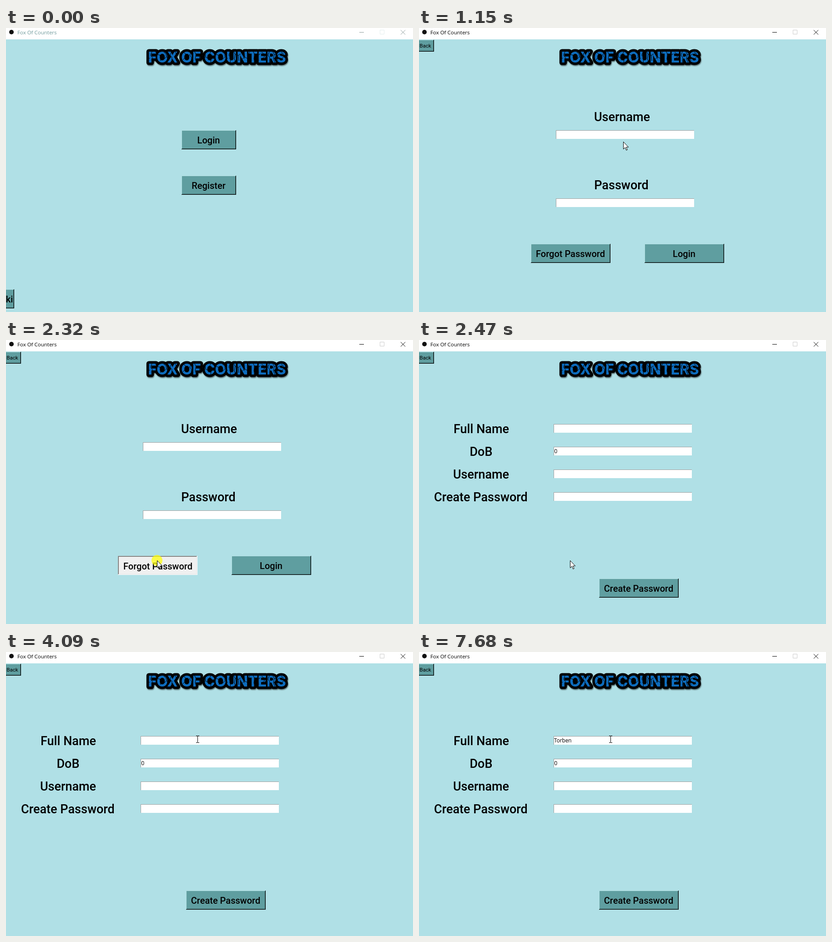
Write an HTML page that moves like this. It is 895 px wide and 625 px high and loops after 8000 ms.

```html
<!DOCTYPE html>
<html lang="en">
<head>
<meta charset="utf-8">
<title>Fox Of Counters</title>
<style>
  html, body { margin: 0; width: 100%; height: 100%; overflow: hidden; background: #b0e0e6; }
  svg { display: block; width: 895px; height: 625px; }
  text { fill: #000; white-space: pre; }
  .label { font: 500 27px Roboto, sans-serif; text-anchor: middle; }
  .button { font: 500 20px Roboto, sans-serif; text-anchor: middle; }
  .button.small { font: 400 11.5px Roboto, sans-serif; }
  .field { font: 11.7px "Open Sans", sans-serif; }
  .caption { font: 11.5px "Open Sans", sans-serif; }
  .banner { font: 800 32px Inter, sans-serif; text-anchor: middle; }
  .banner.rim { stroke: #000; stroke-width: 11; stroke-linejoin: round; filter: drop-shadow(1px 2px 1px #0008); }
  .banner.face { fill: url(#cracked); }
  .controls { fill: none; stroke: #000; }
  .controls .off { stroke: #ccc; }
  .idle .caption { fill: #6f9a9c; }
  .idle .controls { stroke: #8c9b9b; }
  .idle .off { stroke: #e4eeee; }
</style>
</head>
<body>
<svg viewBox="0 0 895 625">
  <defs>
    <pattern id="cracked" width="43" height="40" patternUnits="userSpaceOnUse">
      <rect width="43" height="40" fill="#0d6cbd"/>
      <path d="M3 13l5 4 1 7 6 3M20 12l-3 8 4 5-1 14M27 11l4 7 7 2 5-3M31 18l-2 10 4 9M8 24l-6 6M38 20l1 12"
            fill="none" stroke="#000" stroke-width="1"/>
    </pattern>
  </defs>
  <rect width="895" height="625" fill="#b0e0e6"/>
  <g id="bar">
    <rect width="895" height="25" fill="#fff"/>
    <circle cx="12" cy="9" r="5" fill="#111"/>
    <text class="caption" x="25" y="14">Fox Of Counters</text>
    <g class="controls">
      <path d="M777 9.5h10"/>
      <path class="off" d="M822.5 4.5h9v9h-9z"/>
      <path d="M868 4.5l10 10M878 4.5l-10 10"/>
    </g>
  </g>
  <text class="banner rim" x="464" y="76">FOX OF COUNTERS</text>
  <text class="banner face" x="464" y="76">FOX OF COUNTERS</text>
  <g id="home"></g>
  <g id="login"></g>
  <g id="create"></g>
  <g id="typing">
    <text id="typed" class="field" x="297" y="199"></text>
    <rect id="caret" y="187" width="2" height="15"/>
  </g>
  <g id="pointer">
    <circle id="glow" r="12" fill="#ff0" fill-opacity=".7"/>
    <path id="arrow" d="M.5 .5v16l3.7-3.5 2.6 6 2.4-1-2.6-5.8h5z" fill="#fff" stroke="#000"/>
    <path id="beam" d="M-3-7.5h3l.5.5.5-.5h3M.5-7v14M-3 7.5h3l.5-.5.5.5h3" fill="none" stroke="#000"/>
  </g>
</svg>
<script>
const LOOP = 8000, STEP = 77;
const $ = id => document.getElementById(id);
const show = (id, on) => $(id).setAttribute('display', on ? 'inline' : 'none');

const RAISED = { face: '#5f9ea0', tl: '#afdde0', tl2: '#5f9ea0', br: '#000', br2: '#395f60', shift: 0 };
const SUNKEN = { face: '#f0f0f0', tl: '#a0a0a0', tl2: '#696969', br: '#fff', br2: '#e3e3e3', shift: 1 };

const rect = (x, y, w, h, fill) =>
  `<rect x="${x}" y="${y}" width="${w}" height="${h}" fill="${fill}"/>`;

const label = (x, y, text) => `<text class="label" x="${x}" y="${y}">${text}</text>`;

function button(x, y, w, h, text, look = RAISED, size = '') {
  const cx = x + w / 2 - .5 + look.shift;
  const base = y + (size ? 17 : 29) + look.shift;
  return rect(x, y, w, h, look.br) + rect(x, y, w - 1, h - 1, look.tl) +
    rect(x + 1, y + 1, w - 2, h - 2, look.br2) + rect(x + 1, y + 1, w - 3, h - 3, look.tl2) +
    rect(x + 2, y + 2, w - 4, h - 4, look.face) +
    `<text class="button ${size}" x="${cx}" y="${base}">${text}</text>`;
}

const entry = (x, y) => rect(x, y, 304, 19, '#a0a0a0') + rect(x + 1, y + 1, 303, 18, '#fff');
const pressed = (id, ...args) => `<g id="${id}">${button(...args, SUNKEN)}</g>`;

const FIELDS = {
  home: [],
  login: [[301, 225], [301, 375]],
  create: [185, 235, 285, 335].map(y => [296, y])
};
const entries = name => FIELDS[name].map(f => entry(...f)).join('');
const back = button(-4, 26, 37, 26, 'Back', RAISED, 'small');
const start = [386, 225, 120, 42, 'Login'];
const forgot = [246, 475, 175, 42, 'Forgot Password'];

$('home').innerHTML = button(...start) + pressed('startDown', ...start) +
  button(386, 325, 120, 42, 'Register') + button(-2, 575, 20, 42, 'ki');

$('login').innerHTML = back + entries('login') +
  label(446.5, 205, 'Username') + label(445, 355, 'Password') +
  button(...forgot) + pressed('forgotDown', ...forgot) +
  button(496, 475, 175, 42, 'Login');

$('create').innerHTML = back + entries('create') +
  label(137, 205, 'Full Name') + label(136.5, 255, 'DoB') +
  label(136.5, 305, 'Username') + label(136, 355, 'Create Password') +
  '<text class="field" x="297.5" y="249">0</text>' +
  button(396, 525, 175, 42, 'Create Password');

// Pointer moves: start time, steps, from, to, ease-out power per axis
const MOVES = [
  [70, 9, [770, 612], [449, 250], [1.7, 1.7]],
  [1223, 11, [449, 250], [332, 470], [1.88, 1.41]],
  [2083, 2, [332, 470], [332, 485], [1, 1.4]],
  [2470, 10, [332, 485], [421, 202], [2.58, 1.91]],
  [3253, 2, [421, 202], [421, 192], [1, 1.4]]
];

// Time, letters typed, caret visible
const KEYS = [
  [3480, 0, 1], [4090, 0, 0], [4440, 0, 1], [4950, 0, 0],
  [5100, 1, 0], [5270, 1, 1], [5650, 2, 1], [5880, 3, 0],
  [6200, 4, 1], [6580, 5, 1], [6750, 5, 0], [6900, 6, 0],
  [7050, 6, 1], [7680, 6, 0]
];
const NAME = 'Torben';

const latest = (list, t) => list.filter(item => item[0] <= t).pop();
const within = (t, a, b) => t >= a && t < b;

function pointerAt(t) {
  const move = latest(MOVES, t);
  if (!move) return null;
  const [begin, steps, from, to, power] = move;
  const u = Math.min(1, Math.floor((t - begin) / STEP) / steps);
  return from.map((a, i) => Math.round(a + (to[i] - a) * (1 - (1 - u) ** power[i])));
}

function drawPointer(t, screen) {
  const at = pointerAt(t);
  show('pointer', at);
  if (!at) return;
  const [x, y] = at;
  const overField = FIELDS[screen].some(([fx, fy]) => within(x, fx, fx + 304) && within(y, fy, fy + 19));
  $('pointer').setAttribute('transform', `translate(${x} ${y})`);
  $('glow').setAttribute('transform', overField ? 'translate(-2 -1)' : '');
  show('glow', within(t, 1000, 1150) || within(t, 2320, 2470) || within(t, 3480, 3630));
  show('arrow', !overField);
  show('beam', overField);
}

function drawTyping(t) {
  const [, count, caret] = latest(KEYS, t) || [0, 0, 0];
  const typed = $('typed');
  typed.textContent = NAME.slice(0, count);
  $('caret').setAttribute('x', 297 + (count ? Math.round(typed.getComputedTextLength()) : 0));
  show('caret', caret);
}

function draw(t) {
  const screen = t < 1150 ? 'home' : t < 2470 ? 'login' : 'create';
  for (const name in FIELDS) show(name, name === screen);
  $('bar').setAttribute('class', t < 1000 ? 'idle' : '');
  show('startDown', t >= 1000);
  show('forgotDown', t >= 2320);
  drawTyping(t);
  drawPointer(t, screen);
}

const origin = performance.now();
function tick() {
  draw((performance.now() - origin) % LOOP);
  requestAnimationFrame(tick);
}
tick();
</script>
</body>
</html>
```
